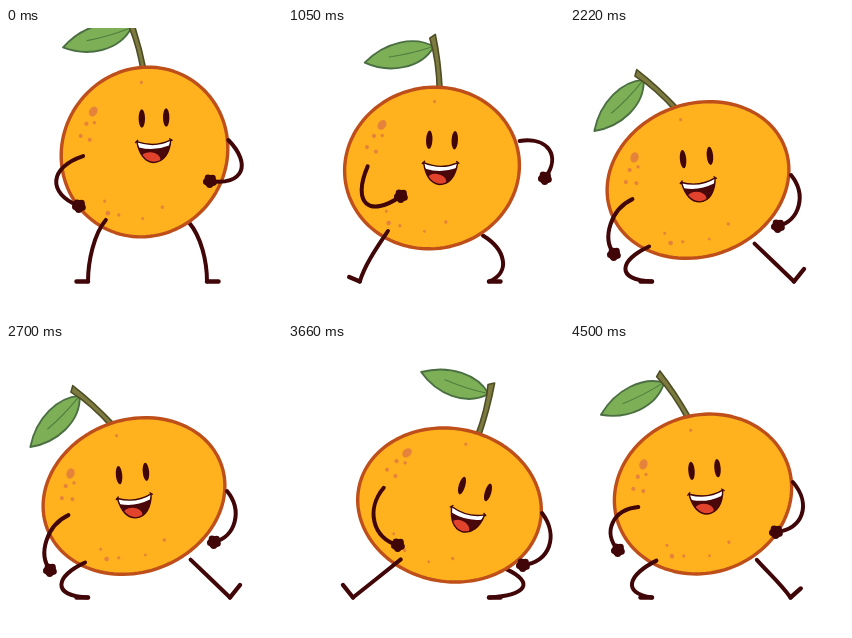
These frames come from a looping animation (276x288 px, 4.53 s). An HTML page with a canvas:

```html
<!DOCTYPE html>
<html lang="en">
<head>
<meta charset="utf-8">
<title>Dancing orange</title>
<style>
  html, body { margin: 0; width: 100%; height: 100%; overflow: hidden; background: #fff; }
  canvas { display: block; width: 276px; height: 288px; }
</style>
</head>
<body>
<canvas id="stage" width="276" height="288"></canvas>
<script>
const ctx = document.getElementById('stage').getContext('2d');
const LOOP = 4530, STEP = 30, CYCLE = 1920, LEAD = 180;
const RADIUS = 84;
const DARK = '#400608';
const rad = d => d * Math.PI / 180;
const mix = (a, b, k) => a + (b - a) * k;

// x, y, ry, rot: body; fx, fy, fr: face; lx, ly, lb and rx, ry2, rb: hands and arm bend;
// sh: right shoulder height; lean: -1 left to 1 right
const right = { x: 161.5, y: 161, ry: 76.7, rot: 17, fx: 22.5, fy: -20.5, fr: 16, stem: 14.5, leaf: 198,
  lx: 100, ly: 199, lb: 23, rx: 230, ry2: 217, rb: 24, sh: 8, lean: 1 };
const rightLow = { ...right, fx: 25.5, fy: -16, fr: 15, lx: 110, ly: 201, rx: 235, ry2: 221 };
const rightUp = { ...right, x: 157, y: 146, ry: 80.5, rot: 10, fx: 18, fy: -25, fr: 10, stem: 8, leaf: 190,
  lx: 92, ly: 190, rx: 236, ry2: 200, sh: 0, lean: 0.6 };
const rightTop = { ...rightUp, y: 127, ry: 83.5, rot: 6, fy: -31, fr: 6, stem: 4, leaf: 177,
  ly: 172, rx: 232, ry2: 178, sh: -5 };
const rightFall = { ...right, x: 157, y: 156, ry: 78.5, rot: 12, fx: 19, fy: -24, fr: 11, stem: 6, leaf: 187,
  lx: 97, ly: 196, rx: 235, ry2: 207, sh: 0, lean: 0.85 };

const left = { x: 128, y: 152, ry: 76.3, rot: -14, fx: -1.5, fy: -22.5, fr: -7, stem: -48, leaf: 134,
  lx: 44, ly: 226, lb: 17, rx: 208, ry2: 198, rb: 20, sh: -5, lean: -1 };
const leftUp = { ...left, x: 133, y: 138, ry: 81.8, rot: -8, fx: 1.5, fy: -25.5, fr: -6, stem: -38, leaf: 136,
  lx: 47, ly: 202, lb: 16, rx: 203, ry2: 187, lean: -0.6 };
const leftTop = { ...leftUp, y: 123, ry: 83.5, rot: -4, fy: -31, stem: -28, leaf: 150,
  lx: 48, ly: 186, ry2: 169, lean: -0.5 };
const leftFall = { ...left, x: 133, y: 150, ry: 79, rot: -9, fx: 1.5, fy: -24.5, fr: -6, stem: -34, leaf: 153,
  lx: 48, ly: 206, lb: 22, rx: 206, ry2: 188, rb: 25, sh: -12, lean: -0.85 };

const toLeft = { x: 138.5, y: 124, ry: 84.7, rot: -1, fx: 9.5, fy: -34, fr: -2, stem: -16, leaf: 164,
  lx: 73, ly: 178, lb: 33, rx: 204, ry2: 153, rb: 32, sh: -12, lean: 0 };
const flingLeft = { ...toLeft, x: 135, y: 139, ry: 80.5, rot: -6, fx: 3, fy: -28, fr: -4, stem: -24, leaf: 161,
  lx: 36, ly: 178, lb: 24, ry2: 173, rb: 28, lean: -0.6 };
const toRight = { ...toLeft, x: 138, fx: 7, stem: -18, leaf: 156, lx: 86, ly: 178, rx: 220, ry2: 152, sh: -18 };
const flingRight = { x: 144, y: 140, ry: 81, rot: 4, fx: 10, fy: -28, fr: 1, stem: -7.5, leaf: 167,
  lx: 113, ly: 168, lb: 38, rx: 257, ry2: 150, rb: 26, sh: -27, lean: 0.6 };
const swingRight = { ...flingRight, x: 153, y: 151, ry: 78.5, rot: 10, fx: 16, fy: -24, fr: 8, stem: 5, leaf: 181,
  ly: 180, lb: 32, rx: 269, ry2: 170, sh: -14, lean: 0.85 };

const moves = [
  [0, right], [180, toLeft], [270, flingLeft],
  [480, left], [600, leftUp], [675, leftTop], [840, leftFall],
  [960, left], [1140, toRight], [1230, flingRight], [1320, swingRight],
  [1440, right], [1560, rightUp], [1635, rightTop], [1800, rightFall]
];
const keys = [];
for (let k = 0; k < 3; k++) {
  for (const [u, pose] of moves) keys.push([k * CYCLE + u - LEAD, k === 2 && u === 0 ? rightLow : pose]);
}

// Smooth curve through the key poses
function poseAt(t) {
  let i = 0;
  while (keys[i + 1][0] <= t) i++;
  const [t0, a] = keys[Math.max(i - 1, 0)], [t1, b] = keys[i], [t2, c] = keys[i + 1], [t3, d] = keys[i + 2];
  const span = t2 - t1, s = (t - t1) / span, pose = {};
  for (const p in b) {
    const m1 = (c[p] - a[p]) / (t2 - t0) * span, m2 = (d[p] - b[p]) / (t3 - t1) * span;
    const e = c[p] - b[p];
    pose[p] = b[p] + s * (m1 + s * (3 * e - 2 * m1 - m2 + s * (m1 + m2 - 2 * e)));
  }
  return pose;
}

function ellipse(x, y, a, b, color, angle = 0) {
  ctx.beginPath();
  ctx.ellipse(x, y, a, b, angle, 0, 7);
  ctx.fillStyle = color;
  ctx.fill();
}

function line(color, width, draw) {
  ctx.beginPath();
  draw();
  ctx.strokeStyle = color;
  ctx.lineWidth = width;
  ctx.stroke();
}

function within(x, y, angle, draw) {
  ctx.save();
  ctx.translate(x, y);
  ctx.rotate(rad(angle));
  draw();
  ctx.restore();
}

function leg(hipX, hipY, side, lean) {
  const bend = Math.max(0, lean), reach = Math.min(1, Math.max(0, -lean));
  const heelX = side < 0 ? mix(82, 65, reach) : mix(201, 224, reach), heelY = 253.5;
  const c1x = mix(hipX + side * mix(12, 30, bend), mix(hipX, heelX, 0.33), reach);
  const c1y = mix(hipY + 14, mix(hipY, heelY, 0.33), reach);
  const c2x = mix(heelX + side * mix(0, 37, bend), mix(hipX, heelX, 0.67), reach);
  const c2y = mix(heelY - mix(20, 2, bend), mix(hipY, heelY, 0.67), reach);
  line(DARK, 4, () => {
    ctx.moveTo(hipX, hipY);
    ctx.bezierCurveTo(c1x, c1y, c2x, c2y, heelX, heelY);
  });
  line(DARK, 4.4, () => {
    ctx.moveTo(heelX, heelY);
    ctx.lineTo(heelX + side * mix(11.5, 10, reach), heelY - 12.5 * reach * reach);
  });
}

function arm(x, y, handX, handY, bend, side) {
  const dx = handX - x, dy = handY - y, len = Math.hypot(dx, dy);
  const nx = side * dy / len * bend, ny = -side * dx / len * bend;
  line(DARK, 4, () => {
    ctx.moveTo(x, y);
    ctx.bezierCurveTo(x + dx * 0.28 + nx, y + dy * 0.28 + ny, x + dx * 0.8 + nx, y + dy * 0.8 + ny, handX, handY);
  });
  ellipse(handX, handY, 6, 6, DARK);
  for (let i = 0; i < 5; i++) {
    const a = i * 1.257 + 0.4;
    ellipse(handX + 3.8 * Math.cos(a), handY + 3.8 * Math.sin(a), 3.3, 3.3, DARK);
  }
}

function stemAndLeaf(p) {
  const a = rad(p.rot), shift = 0.4 * p.rot;
  const x = p.x + shift * Math.cos(a) + p.ry * Math.sin(a);
  const y = p.y + shift * Math.sin(a) - p.ry * Math.cos(a);
  const s = rad(p.stem);
  within(x + 41 * Math.sin(s), y - 41 * Math.cos(s), p.leaf, () => {
    ctx.beginPath();
    ctx.moveTo(0, 0);
    ctx.bezierCurveTo(16, 15, 46, 16, 71, 0);
    ctx.bezierCurveTo(50, -16, 18, -19, 0, 0);
    ctx.fillStyle = '#7db056';
    ctx.fill();
    ctx.strokeStyle = '#4b6f42';
    ctx.lineWidth = 1.9;
    ctx.stroke();
    line('#4f7d3f', 1.1, () => {
      ctx.moveTo(3, 0);
      ctx.quadraticCurveTo(24, -2, 46, 0);
    });
  });
  within(x, y, p.stem, () => {
    ctx.beginPath();
    ctx.moveTo(-2.5, 4);
    ctx.quadraticCurveTo(1, -26, -3, -50);
    ctx.lineTo(3, -53);
    ctx.quadraticCurveTo(5, -26, 2.5, 4);
    ctx.closePath();
    ctx.fillStyle = '#7d7a40';
    ctx.fill();
    ctx.strokeStyle = '#4d4d25';
    ctx.lineWidth = 1.6;
    ctx.stroke();
  });
}

const spots = [
  [-51, -41, 4], [-58, -29, 2.1], [-50, -30, 1.7], [-64, -17, 2], [-55, -13, 2],
  [-2, -69, 1.6], [-41, 48, 1.5], [-38, 60, 2.3], [-27, 62, 1.6], [-3, 66, 1.4], [17, 55, 1.7]
];

function fruit(p, wide) {
  // Round outline, slightly fuller at the upper right and lower left
  const peel = new Path2D();
  for (let i = 0; i < 120; i++) {
    const a = rad(i * 3), r = 1 + 0.022 * Math.cos(2 * a + Math.PI / 2);
    peel.lineTo(wide * r * Math.cos(a), p.ry * r * Math.sin(a));
  }
  peel.closePath();
  within(p.x, p.y, p.rot, () => {
    ctx.fillStyle = '#ffb21d';
    ctx.fill(peel);
    ctx.strokeStyle = '#be4f1b';
    ctx.lineWidth = 3.4;
    ctx.stroke(peel);
    for (const [x, y, r] of spots) {
      ellipse(x * wide / RADIUS, y * p.ry / RADIUS, r, r > 3 ? 5.3 : r, '#e5823b', 0.55);
    }
  });
}

function face(p, sx) {
  within(p.x + p.fx, p.y + p.fy, p.fr, () => {
    for (const side of [-1, 1]) ellipse(side * 12.3 * sx, 0, 3.2, 9.2, DARK, 0.03);
    ctx.translate(-1, 23);
    const mouth = new Path2D('M-17 0Q1 7 17 -.5C15.5 13 9 21.5 -1 21.5C-10 20.5 -15 12 -17 0Z');
    ctx.fillStyle = '#4a080b';
    ctx.fill(mouth);
    ctx.save();
    ctx.clip(mouth);
    ellipse(-4, 18, 10, 7, '#e2432c', 0.1);
    ctx.fillStyle = '#fff';
    ctx.fill(new Path2D('M-18 -1H18L15 5Q0 10.5 -15 6Z'));
    ctx.restore();
    ctx.strokeStyle = DARK;
    ctx.lineWidth = 1.4;
    ctx.stroke(mouth);
    line(DARK, 1.3, () => {
      ctx.moveTo(-18.3, 0.8);
      ctx.lineTo(-16, -1.4);
      ctx.moveTo(16, -1.8);
      ctx.lineTo(18.3, 0);
    });
  });
}

function draw(t) {
  const p = poseAt(t), wide = RADIUS * RADIUS / p.ry;
  const sx = wide / RADIUS, sy = p.ry / RADIUS, a = rad(p.rot), stride = Math.abs(p.lean);
  ctx.fillStyle = '#fff';
  ctx.fillRect(0, 0, 276, 288);
  ctx.lineCap = ctx.lineJoin = 'round';

  leg(p.x + 45 * sx + 7 * stride, p.y + 70 * sy, 1, p.lean);
  stemAndLeaf(p);
  fruit(p, wide);
  leg(p.x - 39 * sx - 6 * stride, p.y + 67 * sy - 0.4 * p.rot, -1, -p.lean);
  face(p, sx);
  const shX = -62 * sx, shY = 3 * sy;
  arm(p.x + shX * Math.cos(a) - shY * Math.sin(a), p.y + shX * Math.sin(a) + shY * Math.cos(a),
    p.lx, p.ly, p.lb, -1);
  arm(p.x + wide + 0.5, p.y + p.sh, p.rx, p.ry2, p.rb, 1);
}

const start = performance.now();
function tick() {
  const t = (performance.now() - start) % LOOP;
  draw(Math.floor(t / STEP) * STEP);
  requestAnimationFrame(tick);
}
tick();
</script>
</body>
</html>
```
